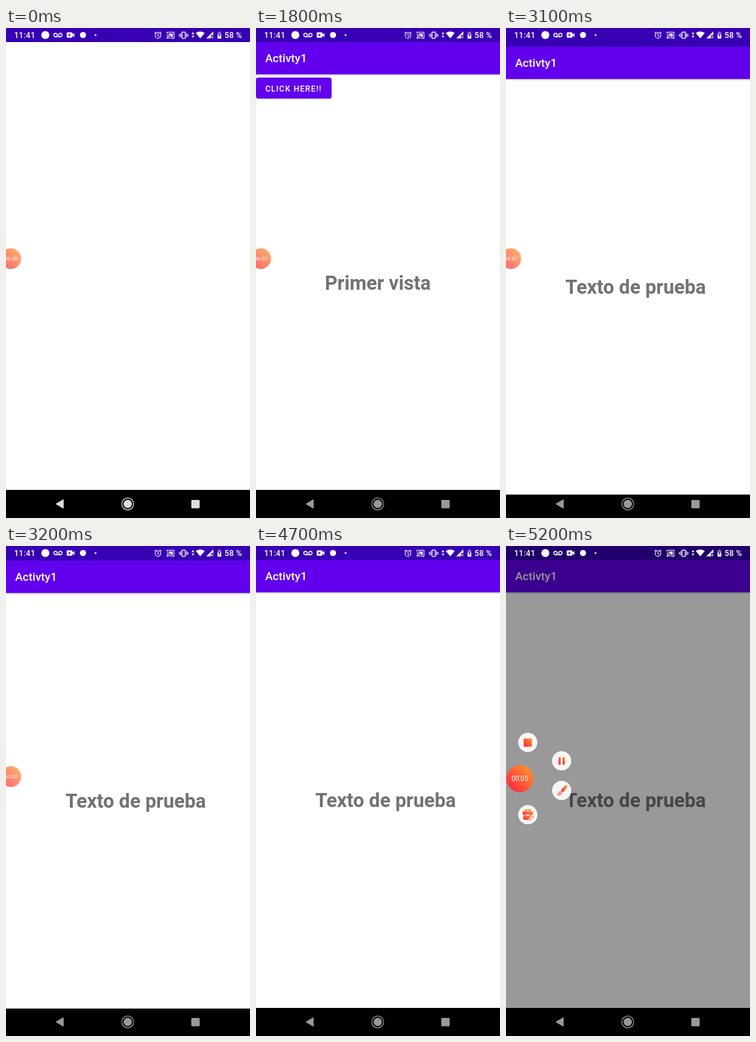
An HTML page for the animation above (6.2 s loop, 366 px wide and 732 px high).

```html
<!DOCTYPE html>
<html lang="es">
<head>
<meta charset="utf-8">
<title>Activty1</title>
<style>
html, body { margin: 0; width: 100%; height: 100%; overflow: hidden; background: #fff; }
svg { display: block; width: 366px; height: 732px; font-family: Roboto, sans-serif; }
.title { font: 500 17.14px Roboto, sans-serif; fill: #fff; }
.label { font: 500 12px Roboto, sans-serif; letter-spacing: 1.07px; fill: #fff; }
.big { font: 700 29.14px Roboto, sans-serif; fill: #727272; }
.clock { font: 500 12px Roboto, sans-serif; fill: #fff; }
.small { font-size: 7.8px; fill: #fff; }
.timer { font-size: 10px; fill: #fff; }

/* 6200 ms loop, held values unless noted */
.a { animation: 6.2s step-end infinite; }
.first { animation-name: first; }
.second { animation-name: second; }
.dim { animation-name: dim; }
.nav { animation-name: nav; }
.data { animation-name: data; }
.bubble { animation-name: bubble; }
.menu { animation-name: menu; }
.s0 { animation-name: s0; }
.s1 { animation-name: s1; }
.s2 { animation-name: s2; }
.s3 { animation-name: s3; }
.s4 { animation-name: s4; }
.s5 { animation-name: s5; }
.ripple { animation: ripple 6.2s linear infinite; transform-origin: 56px 90px; }

@keyframes first { 0% { opacity: 0 } 14.51%, 100% { opacity: 1 } }
@keyframes second {
  0% { opacity: 0; transform: translateY(7px) }
  50% { opacity: 1; transform: translateY(7px) }
  51.61% { opacity: 1; transform: translateY(1px) }
  53.22%, 100% { opacity: 1; transform: none }
}
@keyframes dim { 0% { opacity: 0 } 79.03% { opacity: .165 } 80.64%, 100% { opacity: .4 } }
@keyframes nav { 0% { color: #ddd } 1.61% { color: #c6c6c6 } 3.22% { color: #afafaf } 4.83%, 100% { color: #999 } }
@keyframes data { 0% { opacity: 1 } 1.61% { opacity: 0 } 25.8%, 100% { opacity: 1 } }
@keyframes bubble { 0% { opacity: 1 } 75.8%, 100% { opacity: 0 } }
@keyframes menu { 0% { opacity: 0 } 79.03%, 100% { opacity: 1 } }
@keyframes s0 { 0% { opacity: 1 } 20.96%, 100% { opacity: 0 } }
@keyframes s1 { 0% { opacity: 0 } 20.96% { opacity: 1 } 37.09%, 100% { opacity: 0 } }
@keyframes s2 { 0% { opacity: 0 } 37.09% { opacity: 1 } 53.22%, 100% { opacity: 0 } }
@keyframes s3 { 0% { opacity: 0 } 53.22%, 100% { opacity: 1 } }
@keyframes s4 { 0% { opacity: 1 } 83.87%, 100% { opacity: 0 } }
@keyframes s5 { 0% { opacity: 0 } 83.87%, 100% { opacity: 1 } }
@keyframes ripple {
  0%, 33.87% { opacity: 0; transform: scale(.3) }
  35% { opacity: .2; transform: scale(.5) }
  37.5% { opacity: .2; transform: scale(1) }
  41.8%, 100% { opacity: 0; transform: scale(1) }
}
</style>
</head>
<body>
<svg viewBox="0 0 366 732">
  <defs>
    <linearGradient id="fire" x1="0" y1="1" x2="1" y2="0">
      <stop offset=".1" stop-color="#ff2740"/>
      <stop offset=".95" stop-color="#ff9a2a"/>
    </linearGradient>
    <linearGradient id="pale" x1="0" y1="1" x2="1" y2="0">
      <stop offset=".1" stop-color="#ff676f"/>
      <stop offset=".95" stop-color="#ffb46d"/>
    </linearGradient>
    <linearGradient id="shade" x1="0" y1="0" x2="0" y2="1">
      <stop offset="0" stop-opacity=".24"/>
      <stop offset="1" stop-opacity="0"/>
    </linearGradient>
    <clipPath id="btn"><rect y="74" width="113.2" height="31.2" rx="3.4"/></clipPath>
    <g id="bar">
      <rect y="69" width="366" height="3" fill="url(#shade)"/>
      <rect y="21" width="366" height="48.2" fill="#6200ee"/>
      <text class="title" x="13.7" y="51.3">Activty1</text>
    </g>
    <g id="disc">
      <circle cy=".5" r="15" opacity=".13"/>
      <circle r="14.5" fill="#f5f5f5"/>
    </g>
  </defs>

  <rect width="366" height="732" fill="#fff"/>
  <rect width="366" height="21" fill="#3700b3"/>
  <rect y="690" width="366" height="42"/>

  <g class="a first">
    <use href="#bar"/>
    <rect y="75" width="114" height="31.6" rx="3.6" opacity=".25"/>
    <rect y="74" width="113.2" height="31.2" rx="3.4" fill="#6200ee"/>
    <g clip-path="url(#btn)"><circle class="ripple" cx="56" cy="90" r="62" fill="#fff"/></g>
    <text class="label" x="13.9" y="94.5">CLICK HERE!!</text>
    <text class="big" x="103.3" y="391.3">Primer vista</text>
  </g>

  <g class="a second">
    <rect width="366" height="690" fill="#fff"/>
    <rect width="366" height="21" fill="#3700b3"/>
    <rect y="690" width="366" height="42"/>
    <use href="#bar"/>
    <text class="big" x="89" y="390">Texto de prueba</text>
  </g>

  <rect class="a dim" width="366" height="690"/>

  <!-- status bar -->
  <g fill="#fff">
    <text class="clock" x="12.3" y="15" letter-spacing=".25">11:41</text>
    <circle cx="59" cy="10.5" r="6"/>
    <g fill="none" stroke="#fff" stroke-width="1.3">
      <circle cx="74.2" cy="10.5" r="2.5"/>
      <circle cx="81.6" cy="10.5" r="2.5"/>
      <path d="M74.2 13h7.4"/>
    </g>
    <path fill-rule="evenodd" d="M92 6.5h6.6q1 0 1 1v2l3-2v6l-3-2v2q0 1-1 1H92q-1 0-1-1v-6q0-1 1-1zM94 8.5v4l3.2-2z"/>
    <circle cx="115.5" cy="10.5" r="4.6"/>
    <circle cx="134.3" cy="10.6" r="1.4"/>

    <g fill="none" stroke="#fff" stroke-width="1.1">
      <circle cx="228" cy="11.2" r="4.2"/>
      <path d="M228 8.6v2.9l2 1.2M222.9 7.9l2.5-2.2M233.1 7.9l-2.5-2.2"/>
      <path d="M241.6 8.5V6.3h10.3v9.2h-4M241.2 10.4a5.3 5.3 0 0 1 5.2 5.3M241.2 12.7a3 3 0 0 1 3 3"/>
      <rect x="264" y="6.2" width="5" height="9.4" rx=".8" stroke-width="1.3"/>
      <path d="M262 7.8v6.2M260.1 9v3.8M271 7.8v6.2M272.9 9v3.8"/>
    </g>
    <path d="M241 14h1.8v1.8H241zM244 8.2h6v5.5h-1.8q-1.1-3.2-4.2-4.3z"/>
    <path class="a data" d="M278.4 9.3h4.2l-2.1-3.2zM278.4 11.4h4.2l-2.1 3.2z"/>
    <path d="M284.7 7.6q6.7-4.6 13.4 0l-6.7 8z"/>
    <path d="M311 5v5.5h-3.6v5h-7z"/>
    <path d="M308.3 12l2.6 3.2M310.9 12l-2.6 3.2" stroke="#fff" stroke-width="1"/>
    <path d="M319 5.2h2.4v1.2h1.5V10h-5.5V6.4h1.6z" opacity=".45"/>
    <path d="M317.4 9.8h5.5v6h-5.5z"/>
    <path d="M320.7 8l-1.9 3.5h1.2v2.6l1.8-3.5h-1.1z" fill="#3700b3"/>
    <text class="clock" x="327.8" y="15" letter-spacing=".15">58 %</text>
  </g>

  <!-- navigation bar -->
  <g class="a nav" fill="currentColor" stroke="currentColor" stroke-linejoin="round">
    <path d="M75 711l11-6.4v12.8z"/>
    <circle cx="182.6" cy="711" r="8.9" fill="none" stroke-width="1.2"/>
    <circle cx="182.6" cy="711" r="5.8"/>
    <rect x="278.5" y="705.5" width="11.5" height="11.5" rx=".5"/>
  </g>

  <!-- recorder bubble -->
  <g class="a bubble">
    <circle cx="7.2" cy="344.5" r="15.4" fill="url(#pale)"/>
    <g class="small">
      <text class="a s0" x="-2.2" y="347.4">00:00</text>
      <text class="a s1" x="-2.2" y="347.4">00:01</text>
      <text class="a s2" x="-2.2" y="347.4">00:02</text>
      <text class="a s3" x="-2.2" y="347.4">00:03</text>
    </g>
  </g>

  <!-- recorder menu -->
  <g class="a menu">
    <circle cx="21" cy="347.5" r="20.3" fill="url(#fire)"/>
    <g class="timer">
      <text class="a s4" x="8.4" y="351.2">00:04</text>
      <text class="a s5" x="8.4" y="351.2">00:05</text>
    </g>
    <g transform="translate(32.7 293.4)">
      <use href="#disc"/>
      <rect x="-6.2" y="-5.9" width="12.4" height="12.2" rx="1" fill="url(#fire)"/>
    </g>
    <g transform="translate(83.5 321)">
      <use href="#disc"/>
      <rect x="-4.7" y="-5.6" width="3.5" height="11.4" rx="1" fill="url(#fire)"/>
      <rect x="1.4" y="-5.6" width="3.5" height="11.4" rx="1" fill="url(#fire)"/>
    </g>
    <g transform="translate(83.5 365.3)">
      <use href="#disc"/>
      <path d="M-7.6 6.6q1.8-.6 2-3.2 1.6-3.8 5-1.6 2.4 3-.4 5.3-2.8 1.6-6.6-.5z" fill="#ff9c84"/>
      <path d="M-1.7.3L4.8-7.2Q7-8.8 8-7 8.6-5.7 7.6-4.4L1.6 3.1Q.6.9-1.7.3z" fill="url(#fire)"/>
    </g>
    <g transform="translate(32.7 401.4)">
      <use href="#disc"/>
      <path d="M-3.4-4.8v-2.4h6.8v2.4" fill="none" stroke="#ff6a35" stroke-width="1.6"/>
      <rect x="-7.7" y="-5.2" width="15.4" height="5.6" rx="1.2" fill="url(#fire)"/>
      <path d="M-6.8 1.2H6.8V6.2q0 1.3-1.3 1.3h-11q-1.3 0-1.3-1.3z" fill="url(#fire)"/>
      <path d="M-2.2-.8h4.4L0 2.2z" fill="#f5f5f5"/>
      <path d="M2.8 7.6L7.8 2.4" stroke="#f5f5f5" stroke-width="4.2"/>
      <path d="M2.6 8L8.4 2" stroke="#ffa58c" stroke-width="2.2" stroke-linecap="round"/>
    </g>
  </g>
</svg>
</body>
</html>
```
